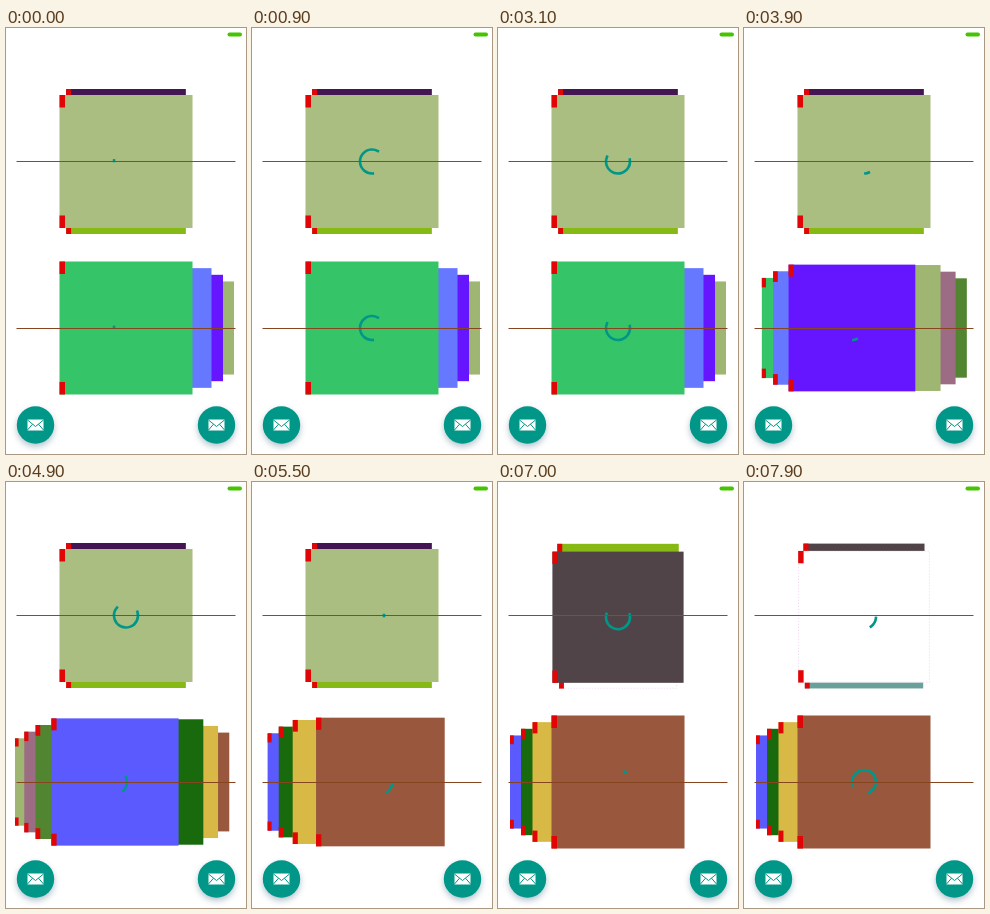
Write an HTML page with a canvas that moves like this. It is 240x426 px and loops after 8000 ms.

```html
<!DOCTYPE html>
<html lang="en">
<head>
<meta charset="utf-8">
<title>Stacked cards</title>
<style>
html, body { margin: 0; width: 100%; height: 100%; overflow: hidden; background: #fff; }
canvas { display: block; width: 100vw; height: 100vh; }
</style>
</head>
<body>
<canvas></canvas>
<script>
const W = 240, H = 426, LOOP = 8000, SIZE = 133, TEAL = '#009688';
const canvas = document.querySelector('canvas');
const ctx = canvas.getContext('2d');
const dpr = window.devicePixelRatio || 1;
canvas.width = W * dpr;
canvas.height = H * dpr;

// keys: [time, position, speed]; edges: outer edge of a card by its depth
const across = {
  y: 300, reach: 3, first: 0, line: '#86441f',
  edges: [66.5, 85.5, 97, 108, 115],
  colors: ['#36c468', '#6678ff', '#6616ff', '#9fb673', '#9c6c84',
           '#52852f', '#5a5aff', '#186a0c', '#d9b945', '#99573e'],
  keys: [[3400, 0, 0], [3900, 2.47, .006], [4460, 5.5, .004], [4900, 6.43, .002], [5700, 9, 0]]
};
const down = {
  y: 133.5, reach: 1, first: -1, vertical: true, line: '#8c3d70',
  edges: [66.5, 72.5, 77],
  colors: ['#431552', '#a9be80', '#86b914', '#504448', '#ffffff', '#6aa09a'],
  keys: [[6500, 0, 0], [6865, 1.5, .003], [7900, 2.9, .0005]]
};

// Cubic through the keys, flat outside them
function position(keys, t) {
  if (t <= keys[0][0]) return keys[0][1];
  for (let i = 1; i < keys.length; i++) {
    const [t0, a, va] = keys[i - 1], [t1, b, vb] = keys[i];
    if (t > t1) continue;
    const d = t1 - t0, u = (t - t0) / d, w = 1 - u;
    return a * w * w * (1 + 2 * u) + b * u * u * (3 - 2 * u)
      + d * u * w * (va * w - vb * u);
  }
  return keys[keys.length - 1][1];
}

// A card's spinner starts when the card first comes into view
function startTime(list, index) {
  if (index <= list.reach) return -3968;
  let t = 0;
  while (t < LOOP && position(list.keys, t) < index - list.reach - .5) t += 4;
  return t;
}
for (const list of [across, down])
  list.starts = list.colors.map((_, i) => startTime(list, i + list.first));

// cubic-bezier(.4, 0, .2, 1)
function ease(x) {
  if (x <= 0) return 0;
  if (x >= 1) return 1;
  let lo = 0, hi = 1, s;
  for (let i = 0; i < 18; i++) {
    s = (lo + hi) / 2;
    const bx = 1.2 * s * (1 - s) ** 2 + .6 * s * s * (1 - s) + s ** 3;
    if (bx < x) lo = s; else hi = s;
  }
  return s * s * (3 - 2 * s);
}

function box(color, x, y, w, h) {
  ctx.fillStyle = color;
  ctx.fillRect(x, y, w, h);
}

function spinner(x, y, age) {
  const p = age / 1345 % 1;
  const base = age * .161 + 90 * p - 90;
  const tail = base + 270 * ease(2 * p - 1);
  const head = base + 270 * ease(2 * p);
  ctx.strokeStyle = TEAL;
  ctx.lineWidth = 2.6;
  ctx.lineCap = 'square';
  ctx.beginPath();
  ctx.arc(x, y, 12, tail * Math.PI / 180, Math.max(head, tail + 2) * Math.PI / 180);
  ctx.stroke();
}

function card(list, index, depth, t) {
  const n = index - list.first, far = Math.abs(depth), k = Math.floor(far);
  const scale = 1 - .1 * far, size = SIZE * scale;
  const edge = list.edges[k] + ((list.edges[k + 1] || list.edges[k]) - list.edges[k]) * (far - k);
  const shift = Math.sign(depth) * (edge - size / 2);
  const cx = 120 + (list.vertical ? 0 : shift);
  const cy = list.y + (list.vertical ? shift : 0);
  const x = cx - size / 2, y = cy - size / 2;
  box(list.colors[n], x, y, size, size);
  if (list.colors[n] === '#ffffff') {
    ctx.strokeStyle = '#ecc6ee';
    ctx.lineWidth = .8;
    ctx.lineCap = 'butt';
    ctx.setLineDash([1, 2]);
    ctx.strokeRect(x + .4, y + .4, size - .8, size - .8);
    ctx.setLineDash([]);
  }
  const w = 5.5 * scale, h = 12.5 * scale;
  box('#e10505', x, y, w, h);
  box('#e10505', x, y + size - h, w, h);
  if (t >= list.starts[n]) spinner(cx, cy, t - list.starts[n]);
}

function stack(list, t) {
  const pos = position(list.keys, t), mid = Math.round(pos);
  const cards = [];
  for (let i = mid - list.reach; i <= mid + list.reach; i++)
    if (list.colors[i - list.first]) cards.push(i);
  cards.sort((a, b) => Math.abs(b - pos) - Math.abs(a - pos));
  for (const i of cards) card(list, i, i - pos, t);
  box(list.line, 10.5, Math.floor(list.y), 219, 1);
}

function mailButton(x, y) {
  ctx.save();
  ctx.translate(x, y);
  ctx.shadowColor = 'rgba(0, 60, 90, .3)';
  ctx.shadowBlur = 6 * dpr;
  ctx.shadowOffsetY = 3 * dpr;
  ctx.fillStyle = TEAL;
  ctx.beginPath();
  ctx.arc(0, 0, 18.7, 0, 2 * Math.PI);
  ctx.fill();
  ctx.shadowColor = 'transparent';
  box('#fff', -8, -5.5, 16, 11);
  ctx.strokeStyle = TEAL;
  ctx.lineWidth = 1;
  ctx.lineCap = 'butt';
  ctx.stroke(new Path2D('M-8-5L0 1.5L8-5M-8 5L-3-.8M8 5L3-.8'));
  ctx.restore();
}

function draw(now) {
  const t = now % LOOP;
  ctx.setTransform(dpr, 0, 0, dpr, 0, 0);
  box('#fff', 0, 0, W, H);
  stack(down, t);
  stack(across, t);
  mailButton(29.5, 397);
  mailButton(210.5, 397);
  ctx.fillStyle = '#46c400';
  ctx.beginPath();
  ctx.roundRect(221.5, 4.5, 14.5, 4, 2);
  ctx.fill();
}

let began;
function tick(now) {
  began ??= now;
  draw(now - began);
  requestAnimationFrame(tick);
}
requestAnimationFrame(tick);
</script>
</body>
</html>
```
